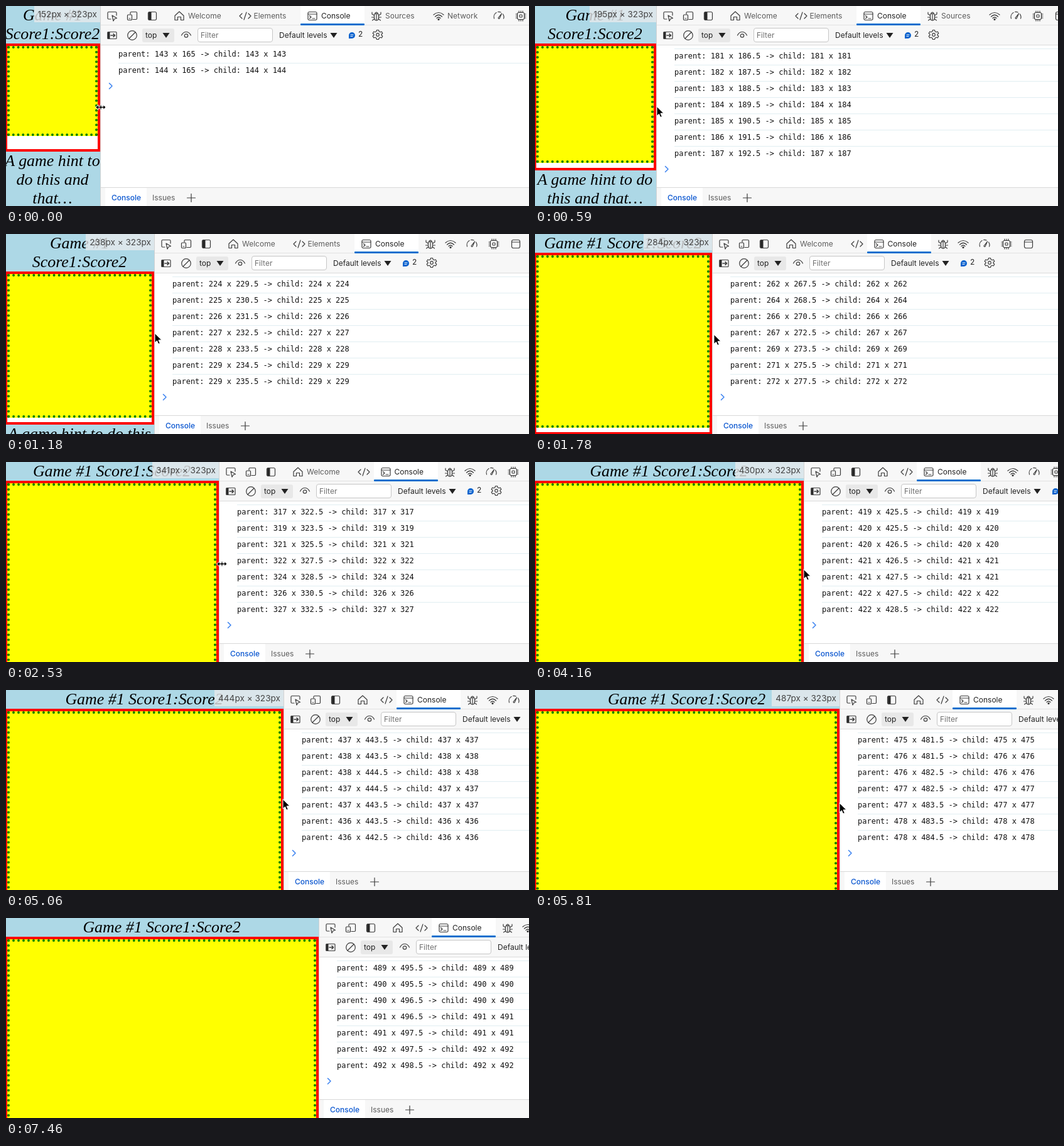
Write an HTML page that moves like this. It is 833x320 px and loops after 8.51 s.

```html
<!DOCTYPE html>
<html lang="en">
<head>
<meta charset="utf-8">
<title>Resizing a page beside a console</title>
<style>
  html, body { margin: 0; width: 100%; height: 100%; overflow: hidden; }
  #stage { position: relative; width: 833px; height: 320px; overflow: hidden; background: #fff; font: 12px/16px Inter, sans-serif; color: #222; }
  #stage svg { position: absolute; overflow: visible; fill: none; stroke: #3c3c3c; stroke-width: 1.2; stroke-linejoin: round; stroke-linecap: round; }
  #page { position: absolute; left: -2px; top: 0; height: 323px; display: grid; grid-template: auto 1fr auto / 100%; background: lightblue; color: #000; font: italic 25.9px/30px "Liberation Serif", serif; text-align: center; }
  main { box-sizing: border-box; border: 4px solid red; background: #fff; }
  #child { box-sizing: border-box; aspect-ratio: 1; border: 4px dotted green; background: yellow; margin-bottom: 6.5px; }
  #size { position: absolute; top: 0; height: 26px; padding: 0 5px 0 6px; background: rgba(232, 234, 237, .8); color: #444; font-size: 13.6px; line-height: 27px; white-space: nowrap; }
  #panel { position: absolute; top: 0; width: 833px; height: 320px; background: #fff; border-left: 1px solid #d2d2d2; }
  #panel div, #panel span { position: absolute; white-space: pre; }
  .bar { left: 0; width: 833px; background: #f7f7f7; box-sizing: border-box; }
  .tab { top: 0; height: 31px; color: #5c5c5c; }
  .tab span { left: 33px; top: 8px; }
  .active { background: #fff; color: #222; }
  .active::after { content: ""; position: absolute; left: 0; right: 0; bottom: 0; height: 3px; border-radius: 1px; background: #0b6fce; }
  #log { left: 0; top: 63px; width: 833px; height: 227px; overflow: hidden; color: #111; font: 12px/22px "DejaVu Sans Mono", monospace; }
  .row { left: 28px; width: 805px; height: 25px; border-top: 1px solid #e1eef2; }
</style>
</head>
<body>
<div id="stage">
  <div id="page">
    <header>Game #1 Score1:Score2</header>
    <main><div id="child"></div></main>
    <footer>A game hint to do this and that…</footer>
  </div>
  <div id="size"></div>
  <div id="panel"></div>
  <svg id="cursor" width="1" height="1"></svg>
</div>
<script>
const LOOP = 8510, STAGE_WIDTH = 833;
const $ = id => document.getElementById(id);

// Icons are drawn around their own centre.
const icons = {
  select: '<path d="M-2 5H-5.500Q-7 5-7 3.500V-5Q-7-6.500-5.500-6.500H5.500Q7-6.500 7-5V-1"/><path d="M0-1 7.500 3.500 4 4.500 2 8Z"/>',
  device: '<path d="M-3-3V-5Q-3-6.500-1.500-6.500H6Q7.500-6.500 7.500-5V4Q7.500 5.500 6 5.500H1"/><rect x="-7.500" y="-2" width="7" height="8.500" rx="1.200"/><path d="M-5 4H-3"/>',
  dock: '<rect x="-6.500" y="-6.500" width="13" height="13" rx="2"/><path d="M-5.500-6H-2V6H-5.500Z" fill="#222"/>',
  home: '<path d="M-7-.5 0-7 7-.5V6.500H2.500V1.500H-2.500V6.500H-7Z"/>',
  code: '<path d="M-5-4-9 0-5 4M5-4 9 0 5 4M2-6-2 6"/>',
  terminal: '<rect x="-7" y="-6.500" width="14" height="13" rx="2"/><path d="M-7-3H7M-4.500-.5-2 1.700-4.500 4M0 4H4"/>',
  bug: '<rect x="-3.500" y="-4" width="7" height="11" rx="3.500"/><path d="M-2.500-4Q0-8 2.500-4M-3.500-1-7-3V-6M3.500-1 7-3V-6M-3.500 2H-7.500M3.500 2H7.500M-3 4.500-6.500 7M3 4.500 6.500 7M0-4V7"/>',
  wifi: '<path d="M-8-2Q0-9 8-2M-5.500 1Q0-4.500 5.500 1M-3 3.500Q0 .5 3 3.500"/><circle cy="5.500" r="1" fill="#222"/>',
  gauge: '<path d="M-7.500 4A8 8 0 0 1-4-5.500M-1.500-6.500Q1-7 3-6M6.500-3Q9 1 7.500 4M-1 3 4.500-4 1 4Q-.5 5-1 3"/>',
  chip: '<rect x="-5.500" y="-5.500" width="11" height="11" rx="2"/><rect x="-2" y="-2" width="4" height="4" rx="1"/><path d="M-3-5.500V-8M0-5.500V-8M3-5.500V-8M-3 5.500V8M0 5.500V8M3 5.500V8M-5.500-3H-8M-5.500 0H-8M-5.500 3H-8M5.500-3H8M5.500 0H8M5.500 3H8"/>',
  app: '<rect x="-6.500" y="-6.500" width="13" height="13" rx="2.500"/><path d="M-6.500-3H6.500"/>',
  sidebar: '<rect x="-7" y="-5.500" width="14" height="11" rx="1"/><path d="M-7-5H-4V5H-7Z" fill="#222"/><path d="M-2 0H4M2-2.500 4.500 0 2 2.500" stroke-width="1.600"/>',
  clear: '<circle r="7.300"/><path d="M5-5-5 5"/>',
  eye: '<path d="M-7.500 1Q-5-4.500 0-4.500T7.500 1"/><circle cy="1.500" r="2.700"/>',
  gear: '<path d="M-1.500-7.500H1.500L2.200-5.300 4.200-4.300 6.300-5 7.800-2.300 6-.8V.8L7.800 2.300 6.300 5 4.200 4.300 2.200 5.300 1.500 7.500H-1.500L-2.200 5.300-4.200 4.300-6.300 5-7.800 2.300-6 .8V-.8L-7.800-2.300-6.300-5-4.200-4.300-2.200-5.300Z"/><circle r="2.300"/>',
  bubble: '<path d="M-5 5V0A5 5 0 1 1 0 5Z" fill="#0b63ce" stroke="none"/><path d="M-2-1H2M-2 1.500H1" stroke="#fff" stroke-width="1"/>',
  down: '<path d="M-5.500-4H5.500L0 4Z" fill="#222" stroke="none"/>',
  plus: '<path d="M-6.500 0H6.500M0-6.500V6.500"/>',
  prompt: '<path d="M-2.500-4.500 2 0-2.500 4.500" stroke="#3b82f0" stroke-width="1.500"/>'
};
const cursors = {
  arrow: '<path d="M0 0V15L3.500 11.800 5.700 17 8.300 16 6 10.800H10.800Z" fill="#000" stroke="#fff" stroke-width="1"/>',
  resize: '<path d="M-8 0-4-4V-1.200H-1V-4H1V-1.200H4V-4L8 0 4 4V1.200H1V4H-1V1.200H-4V4Z" fill="#000" stroke="#fff" stroke-width="1"/>'
};
const icon = (name, x, y) => `<svg width="1" height="1" style="left:${x}px;top:${y}px">${icons[name]}</svg>`;
const text = (string, x, y, style = '') => `<span style="left:${x}px;top:${y - 8}px;${style}">${string}</span>`;
const box = (x, y, w, h, style) => `<div style="left:${x}px;top:${y}px;width:${w}px;height:${h}px;${style}"></div>`;

// Labels hide when the panel is narrower than minPanel.
const tabs = [
  { icon: 'home', label: 'Welcome', full: 104.5, short: 38, minPanel: 481 },
  { icon: 'code', label: 'Elements', full: 107.5, short: 35, minPanel: 553 },
  { icon: 'terminal', label: 'Console', full: 102, short: 102, minPanel: 0 },
  { icon: 'bug', label: 'Sources', full: 99, short: 32, minPanel: 620 },
  { icon: 'wifi', label: 'Network', full: 96, short: 34, minPanel: 682 },
  { icon: 'gauge', short: 35 },
  { icon: 'chip', short: 35 },
  { icon: 'app', short: 35 }
];
const ROWS = 7, ROW_HEIGHT = 26;

$('panel').innerHTML = `
  <div class="bar" style="top:0;height:31px;border-bottom:1px solid #e3e3e3"></div>
  <div class="bar" style="top:31px;height:32px;border-bottom:1px solid #dcdcdc"></div>
  <div class="bar" style="top:290px;height:30px;border-top:1px solid #d8d8d8"></div>
  ${icon('select', 18, 16)}${icon('device', 50, 16)}${icon('dock', 82, 16)}
  ${tabs.map(t => `<div class="tab${t.label === 'Console' ? ' active' : ''}">${icon(t.icon, 19, 16)}<span>${t.label || ''}</span></div>`).join('')}
  ${icon('sidebar', 18, 47)}${icon('clear', 50, 47)}
  ${box(66, 36, 51, 22, 'background:#e8e8e8;border-radius:3px')}
  ${text('top', 71, 47)}${icon('down', 104, 47)}${icon('eye', 136, 46)}
  ${box(154, 35, 118, 21, 'background:#fff;border:1px solid #c6c6c6;border-radius:4px')}
  ${text('Filter', 159, 47, 'color:#707070')}
  ${text('Default levels', 284, 47)}${icon('down', 371, 47)}
  ${icon('bubble', 400, 47)}${text('2', 410, 45)}${icon('gear', 441, 46)}
  ${box(7, 291, 66, 29, 'background:#fff')}
  ${text('Console', 17, 307, 'color:#0b57d0;font-weight:500')}
  ${text('Issues', 82, 307, 'color:#5c5c5c')}${icon('plus', 144, 307)}
  <div id="log">${'<div class="row"></div>'.repeat(ROWS)}${icon('prompt', 16, 0)}</div>`;
const tabElements = [...document.querySelectorAll('.tab')];
const rowElements = [...document.querySelectorAll('.row')];
const promptIcon = $('log').querySelector('svg');

// Every logged parent width; a step of one half logs each width twice.
const widths = [143, 144];
const run = (from, to, step = 1) => {
  for (let w = from; w <= to + 1e-6; w += step) widths.push(Math.ceil(w - 1e-6));
  return widths.length;
};
const add = (...list) => widths.push(...list);

// Step, page width, pointer position, number of logged lines.
const keys = [
  [0, 152, 151, 162, 2],
  [8, 238, 237, 159, (run(145, 229), add(229))],
  [17, 341, 344, 163, run(317 - 52 * 5 / 3, 327, 5 / 3)],
  [24, 397, 397, 170, (run(329, 383, 1.5), add(384, 386, 386, 387, 388, 389, 389))],
  [30, 446, 444, 173, run(390, 438, .5)],
  [34, 444, 441, 175, add(437, 437, 436, 436)],
  [39, 487, 485, 181, run(436.5, 478, .5)],
  [43, 500, 499, 186, run(478.5, 492, .5)]
];

function poseAt(step) {
  const i = Math.min(keys.length - 2, keys.findLastIndex(k => k[0] <= step));
  const a = keys[i], b = keys[i + 1], u = (step - a[0]) / (b[0] - a[0]);
  return a.map((v, j) => Math.round(v + (b[j] - v) * u));
}

function drawTabs(panelWidth) {
  let x = 106;
  tabs.forEach((tab, i) => {
    const open = tab.label && panelWidth >= tab.minPanel;
    const width = open ? tab.full : tab.short;
    tabElements[i].style.left = x + 'px';
    tabElements[i].style.width = width + 'px';
    tabElements[i].lastChild.style.display = open ? '' : 'none';
    x += width;
  });
}

function drawLog(count) {
  const promptY = Math.min(128 + ROW_HEIGHT * (count - 2), 261) - 63;
  promptIcon.style.top = promptY + 'px';
  rowElements.forEach((row, i) => {
    const index = count - 1 - i;
    row.style.display = index < 0 ? 'none' : '';
    if (index < 0) return;
    const w = widths[index], h = Math.max(165, (widths[index - 1] || 0) + 6.5);
    row.textContent = `parent: ${w} x ${h} -> child: ${w} x ${w}`;
    row.style.top = promptY - 37 - ROW_HEIGHT * i + 'px';
    row.style.borderColor = index ? '' : 'transparent';
  });
}

function draw(now) {
  const t = now % LOOP;
  const step = Math.min(43, Math.floor((t + 20) / 149.1));
  let [, pageWidth, x, y, count] = poseAt(step);
  const done = t >= 7460;

  $('page').style.width = pageWidth + 'px';
  $('size').textContent = `${pageWidth}px × 323px`;
  $('size').style.right = STAGE_WIDTH - pageWidth + 2 + 'px';
  $('size').style.display = done ? 'none' : '';
  $('panel').style.left = pageWidth - 2 + 'px';
  drawTabs(STAGE_WIDTH - pageWidth + 1);
  drawLog(count);

  if (t >= 7310) [x, y] = [564, 234];
  const shape = step < 4 || (step > 12 && step < 21) ? 'resize' : 'arrow';
  const cursor = $('cursor');
  if (cursor.dataset.shape !== shape) {
    cursor.dataset.shape = shape;
    cursor.innerHTML = cursors[shape];
  }
  cursor.style.left = x + 'px';
  cursor.style.top = y + 'px';
  cursor.style.display = done ? 'none' : '';
}

function tick() {
  draw(performance.now());
  requestAnimationFrame(tick);
}
tick();
</script>
</body>
</html>
```
